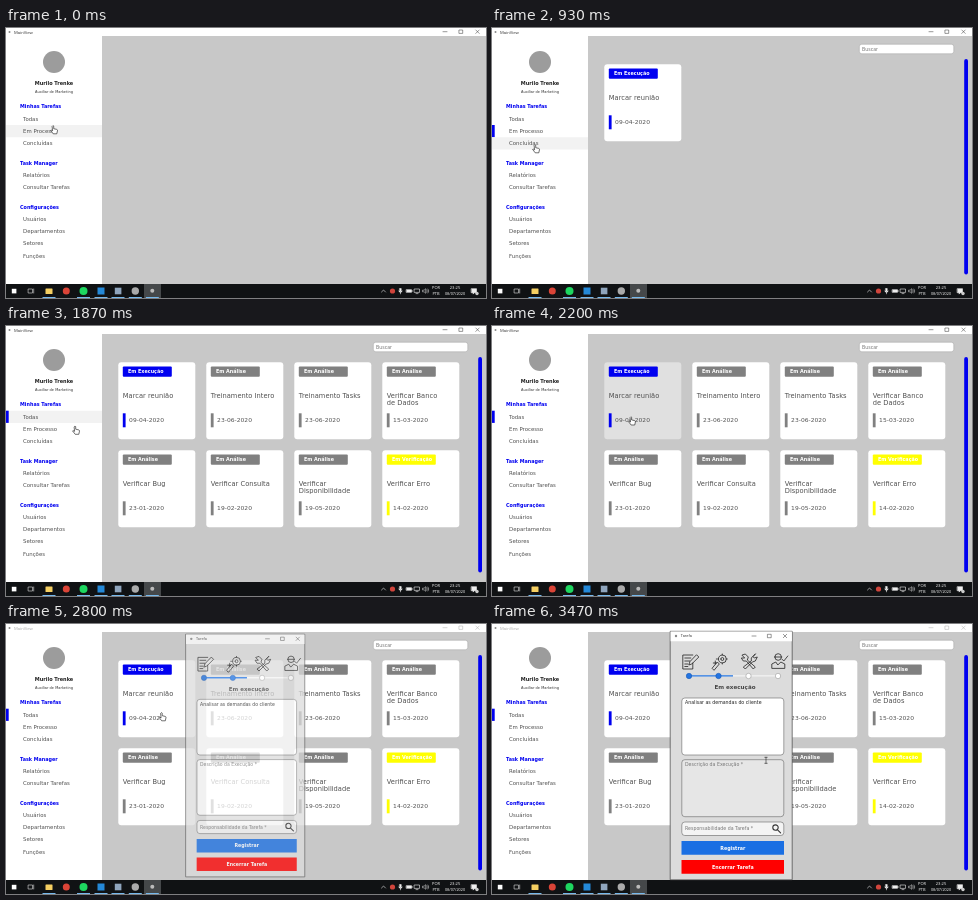
Recreate the animation shown at these times as an HTML page with a canvas. Size 480x270 px, loop 3.54 s.

```html
<!DOCTYPE html>
<html lang="pt">
<head>
<meta charset="utf-8">
<title>MainView</title>
<style>
html, body { margin: 0; width: 100%; height: 100%; overflow: hidden; background: #c8c8c8; }
canvas { display: block; width: 100vw; height: 100vh; }
</style>
</head>
<body>
<canvas></canvas>
<script>
const canvas = document.querySelector('canvas');
const g = canvas.getContext('2d');
const LOOP = 3540, STEP = 200 / 3;
const BLUE = '#0000f0', GREY = '#808080', INK = '#505050';
const SANS = '"DejaVu Sans", sans-serif', UI = '"Open Sans", sans-serif';

function box(x, y, w, h, fill, r = 0, stroke, lw = 0.6) {
  g.beginPath();
  g.roundRect(x, y, w, h, r);
  if (fill) { g.fillStyle = fill; g.fill(); }
  if (stroke) { g.strokeStyle = stroke; g.lineWidth = lw; g.stroke(); }
}

function dot(x, y, r, fill, stroke) {
  box(x - r, y - r, 2 * r, 2 * r, fill, r, stroke);
}

// Set at ten times the size and scaled down, so small glyphs keep exact widths; y is the middle of the capitals
function text(s, x, y, size, color, { bold = false, align = 'left', font = SANS } = {}) {
  g.save();
  g.translate(x, y + size * 0.36);
  g.scale(0.1, 0.1);
  g.font = `${bold ? 'bold ' : ''}${size * 10}px ${font}`;
  g.textAlign = align;
  g.fillStyle = color;
  g.fillText(s, 0, 0);
  g.restore();
}

function path(d, x, y, stroke, lw = 0.6, fill) {
  const p = new Path2D(d);
  g.save();
  g.translate(x, y);
  g.lineJoin = g.lineCap = 'round';
  if (fill) { g.fillStyle = fill; g.fill(p); }
  g.strokeStyle = stroke;
  g.lineWidth = lw;
  g.stroke(p);
  g.restore();
}

function windowButtons(xs, y, color) {
  const shapes = ['M-2 0h4', 'M-1.7-1.7h3.4v3.4h-3.4z', 'M-1.7-1.7l3.4 3.4M1.7-1.7l-3.4 3.4'];
  shapes.forEach((d, i) => path(d, xs[i], y, color, 0.5));
}

// Pointer: time, x, y
const keys = [
  [0, 47, 97.5], [200, 46, 88], [266, 46, 88], [466, 43, 101.5], [666, 43, 101.5],
  [866, 43, 116.5], [1400, 43, 116.5], [1666, 50, 90], [1800, 52, 90], [1866, 69, 100],
  [2330, 155.5, 88.5], [2933, 155.5, 88.5], [3466, 274, 136.3]
];

function pointer(t) {
  const i = keys.findIndex(k => k[0] > t);
  if (i < 0) return keys.at(-1).slice(1);
  if (!i) return keys[0].slice(1);
  const [t0, x0, y0] = keys[i - 1], [t1, x1, y1] = keys[i];
  const p = (t - t0) / (t1 - t0), k = p * p * (3 - 2 * p);
  return [x0 + (x1 - x0) * k, y0 + (y1 - y0) * k];
}

const inside = ([px, py], x, y, w, h) => px >= x && px < x + w && py >= y && py < y + h;

const menu = [
  ['Minhas Tarefas', 78.5, 1], ['Todas', 90.7], ['Em Processo', 103], ['Concluídas', 115.2],
  ['Task Manager', 135, 1], ['Relatórios', 147], ['Consultar Tarefas', 159.2],
  ['Configurações', 179, 1], ['Usuários', 191], ['Departamentos', 203.2], ['Setores', 215.4], ['Funções', 227.6]
];

const statusColor = { 'Em Execução': BLUE, 'Em Análise': GREY, 'Em Verificação': '#ffff00', 'Concluído': '#00ff00' };
const run = ['Em Execução', 'Marcar reunião', '09-04-2020'];
const all = [
  run,
  ['Em Análise', 'Treinamento Intero', '23-06-2020'],
  ['Em Análise', 'Treinamento Tasks', '23-06-2020'],
  ['Em Análise', 'Verificar Banco\nde Dados', '15-03-2020'],
  ['Em Análise', 'Verificar Bug', '23-01-2020'],
  ['Em Análise', 'Verificar Consulta', '19-02-2020'],
  ['Em Análise', 'Verificar\nDisponibilidade', '19-05-2020'],
  ['Em Verificação', 'Verificar Erro', '14-02-2020']
];
const done = [['Concluído', 'Tarefa Nova', '23-06-2020']];

// Cards shown and menu row marked, by step
function view(n) {
  if (n < 5) return [null, -1];
  if (n < 10) return [all, 1];
  if (n < 15) return [[run], 2];
  if (n < 28) return [done, 3];
  return [all, 1];
}

function sidebar(at, selected) {
  box(0, 8, 96, 248, '#fff');
  dot(48, 34, 11, '#9c9c9c');
  text('Murilo Trenke', 48, 55, 5, '#222', { bold: true, align: 'center' });
  text('Auxiliar de Marketing', 48, 63.5, 3.55, '#333', { align: 'center' });
  menu.forEach(([label, y, head], i) => {
    if (head) return text(label, 14, y, 4.85, BLUE, { bold: true });
    if (inside(at, 0, y - 6, 96, 12.2)) box(0, y - 6, 96, 12.2, '#f2f2f2');
    if (i === selected) box(0, y - 6, 2.7, 12.2, BLUE);
    text(label, 17, y, 5.4, INK);
  });
}

function card([status, title, date], i, at) {
  const x = 112.3 + i % 4 * 88, y = 36.3 + (i >> 2) * 88, color = statusColor[status];
  box(x, y, 77, 77, inside(at, x, y, 77, 77) ? '#e0e0e0' : '#fff', 3);
  box(x + 4.5, y + 4.2, 49, 10.3, color, 1);
  text(status, x + 9.7, y + 9.4, 4.85, '#fff', { bold: true });
  title.split('\n').forEach((s, k) => text(s, x + 4.5, y + 32.8 + k * 7, 6.7, INK));
  box(x + 4.5, y + 51, 2.8, 14, color);
  text(date, x + 10.8, y + 58, 6, INK);
}

function taskbar(active) {
  box(0, 256, 480, 14, '#101214');
  if (active) box(138, 256, 17, 14, '#45484a');
  box(5.8, 260.8, 4.6, 4.6, '#fff');
  path('M-2-2h4v4h-4zM3.2-2v4', 24.5, 263, '#ddd', 0.6);
  box(39.5, 260.5, 7, 5.5, '#f5cf62', 0.5);
  dot(60.3, 263, 3.5, '#db4437');
  dot(77.5, 263, 4, '#1ed760');
  box(91.5, 259.5, 7, 7, '#2489d8');
  box(108.8, 259.7, 6.6, 6.6, '#8fa5bd');
  dot(129.3, 263, 3.7, '#aaa');
  dot(146.3, 262.8, 2, '#bbb');
  for (const x of [43, 77.5, 95, 112, 129.3, 146.3]) box(x - 6.5, 269, 13, 1, '#76b9ed');
  path('M-2 1l2-2 2 2', 377.5, 263, '#eee');
  dot(386.5, 263, 2.6, '#d0453c');
  path('M-.7-2.5h1.4v3h-1.4zM-1.7 0q1.7 3 3.4 0M0 1.6v1.2', 394.5, 263, '#eee', 0.6, '#eee');
  path('M-2.5-1.3h5v2.6h-5zM3.2-.5v1', 403, 263, '#eee', 0.6, '#eee');
  path('M-2.5-2h5v3.4h-5zM-1 2.6h2', 411, 263, '#eee');
  path('M-2.6-.8h1.2l1.6-1.5v4.6l-1.6-1.5h-1.2zM1.4-1.2q1 1.2 0 2.4M2.5-2q1.8 2 0 4', 419.5, 263, '#eee', 0.5);
  const o = { font: UI, align: 'center' };
  text('POR', 430, 260, 4, '#fff', o);
  text('PTB', 430, 266, 4, '#fff', o);
  text('23:25', 449, 260, 4.1, '#fff', o);
  text('08/07/2020', 449, 266, 3.8, '#fff', o);
  path('M-2.5-2.3h5v4h-2.2l-1.2 1.4v-1.4h-1.6z', 468, 263, '#eee', 0.6, '#eee');
  dot(471, 265.5, 1.7, '#ccc');
}

const stepIcons = [
  'M3-6h-10v14h10v-6M-5-3h6M-5 0h5M-5 3h3M-5 5.5h3M7-6l2 2-7 7-3 1 1-3z',
  'M-7 7l5-6 2 2-5 6zM-1-2a4 4 0 1 0 8 0a4 4 0 1 0-8 0M1.5-2a1.5 1.5 0 1 0 3 0a1.5 1.5 0 1 0-3 0M3-7v1M3 2v1M-3-2h1M7-2h1M-6 2h3M-4 0v3',
  'M-7-6l3-1 3 3-1 3 8 7-2 2-7-8-3 0-2-3 3 0zM6-7l-4 4 0 3-8 6 2 2 7-7 3-1 2-4-3 1-1-1z',
  'M-4-4a3.3 3.3 0 1 0 6.6 0a3.3 3.3 0 1 0-6.6 0M-4-4h7M-7 7v-4l4-2 2 3 3-3 4 2v4zM3-2l2 2 4-5'
];

function dialog(at) {
  box(178.2, 7.3, 122, 248.5, '#dcdcdc', 0, '#444', 0.7);
  box(178.6, 7.6, 121.3, 9.7, '#fff');
  dot(184, 12, 1.2, '#888');
  text('Tarefa', 188.8, 12, 3.9, '#333', { font: UI });
  windowButtons([262, 277.5, 293], 12, '#333');
  const xs = [197, 226.5, 256.5, 286];
  stepIcons.forEach((d, i) => path(d, xs[i] + 0.8, 37, '#222', 0.8));
  box(197, 51.2, 89, 1.4, '#f4f4f4');
  box(197, 51.2, 44, 1.4, '#2374e1');
  xs.forEach((x, i) => dot(x, 52, 2.7, i < 2 ? '#2374e1' : '#fff', i < 2 ? '#1c5cb5' : '#999'));
  text('Em execução', 243, 63.2, 5.6, '#444', { bold: true, align: 'center' });
  const areas = [[74, 'Analisar as demandas do cliente', '#222'], [135.7, 'Descrição da Execução *', '#777']];
  for (const [y, label, color] of areas) {
    box(189.8, y, 102, 57, inside(at, 190, y, 102, 57) ? '#e6e6e6' : '#fff', 3, '#666');
    text(label, 193, y + 4.8, 4.7, color);
  }
  box(189.8, 198, 102, 13.5, '#f4f4f4', 3, '#666');
  text('Responsabilidade da Tarefa *', 193, 204.7, 4.7, '#777');
  path('M-3.5-1a2.7 2.7 0 1 0 5.4 0a2.7 2.7 0 1 0-5.4 0M1.3 1.2l3 3', 284.3, 204.6, '#333', 1.1);
  const buttons = [[217, '#1a6fe3', 'Registrar'], [236, '#ff0000', 'Encerrar Tarefa']];
  for (const [y, color, label] of buttons) {
    box(189.5, y, 102.5, 13.8, color);
    text(label, 240.8, y + 6.9, 4.8, '#fff', { bold: true, align: 'center' });
  }
}

function drawPointer([x, y], inDialog) {
  if (inDialog && x > 190) path('M-1.2-3h2.4M0-3v6M-1.2 3h2.4', x, y, '#222', 0.6);
  else path('M-.7.6q.7-1.2 1.4 0v2.6l3 .7q.9.3.8 1.2l-.7 3.2h-3.6l-2.6-3.4q0-1 1.7.2z', x, y, '#111', 0.6, '#fff');
}

function draw(n) {
  const t = n * STEP, at = pointer(t);
  const lag = pointer(t - STEP);  // hover follows one step late
  const focused = n < 39, opened = n > 41;
  const [cards, selected] = view(n);
  const tone = focused ? '#333' : '#aaa';

  box(0, 0, 480, 270, '#c8c8c8');
  box(0, 0, 480, 8, '#fff');
  dot(3.5, 4, 1, '#888');
  text('MainView', 8, 4, 4.2, tone, { font: UI });
  windowButtons([439, 455, 471.5], 3.7, tone);
  sidebar(lag, selected);
  if (n > 4) {
    box(367.3, 16.2, 94.5, 9.6, '#fff', 2.5, '#aaa');
    text('Buscar', 370, 21, 4.7, '#777');
    box(472.2, 31, 3.8, 215.5, BLUE, 1.9);
  }
  cards?.forEach((c, i) => card(c, i, opened ? [0, 0] : lag));
  taskbar(focused || opened);

  if (opened) {
    const p = Math.min((t - 2733) / 130, 1), k = 1 - (1 - p) ** 2, s = 0.9 + 0.1 * k;
    // Fade the dialog as one layer: paint it opaque, then lay the view back over it
    const back = k < 1 && document.createElement('canvas');
    if (back) {
      back.width = canvas.width;
      back.height = canvas.height;
      back.getContext('2d').drawImage(canvas, 0, 0);
    }
    g.save();
    g.translate(239.2, 131.5);
    g.scale(s, s);
    g.translate(-239.2, -131.5);
    dialog(at);
    g.restore();
    if (back) {
      g.globalAlpha = 1 - k;
      g.drawImage(back, 0, 0, 480, 270);
      g.globalAlpha = 1;
    }
  }
  drawPointer(at, opened);
}

const start = performance.now();

function frame() {
  const dpr = devicePixelRatio || 1;
  const w = Math.round(innerWidth * dpr), h = Math.round(innerHeight * dpr);
  if (canvas.width !== w || canvas.height !== h) {
    canvas.width = w;
    canvas.height = h;
  }
  g.setTransform(w / 480, 0, 0, h / 270, 0, 0);
  const t = (performance.now() - start) % LOOP;
  draw(Math.min(Math.floor((t + 4) / STEP), 52));
  requestAnimationFrame(frame);
}
frame();
</script>
</body>
</html>
```
